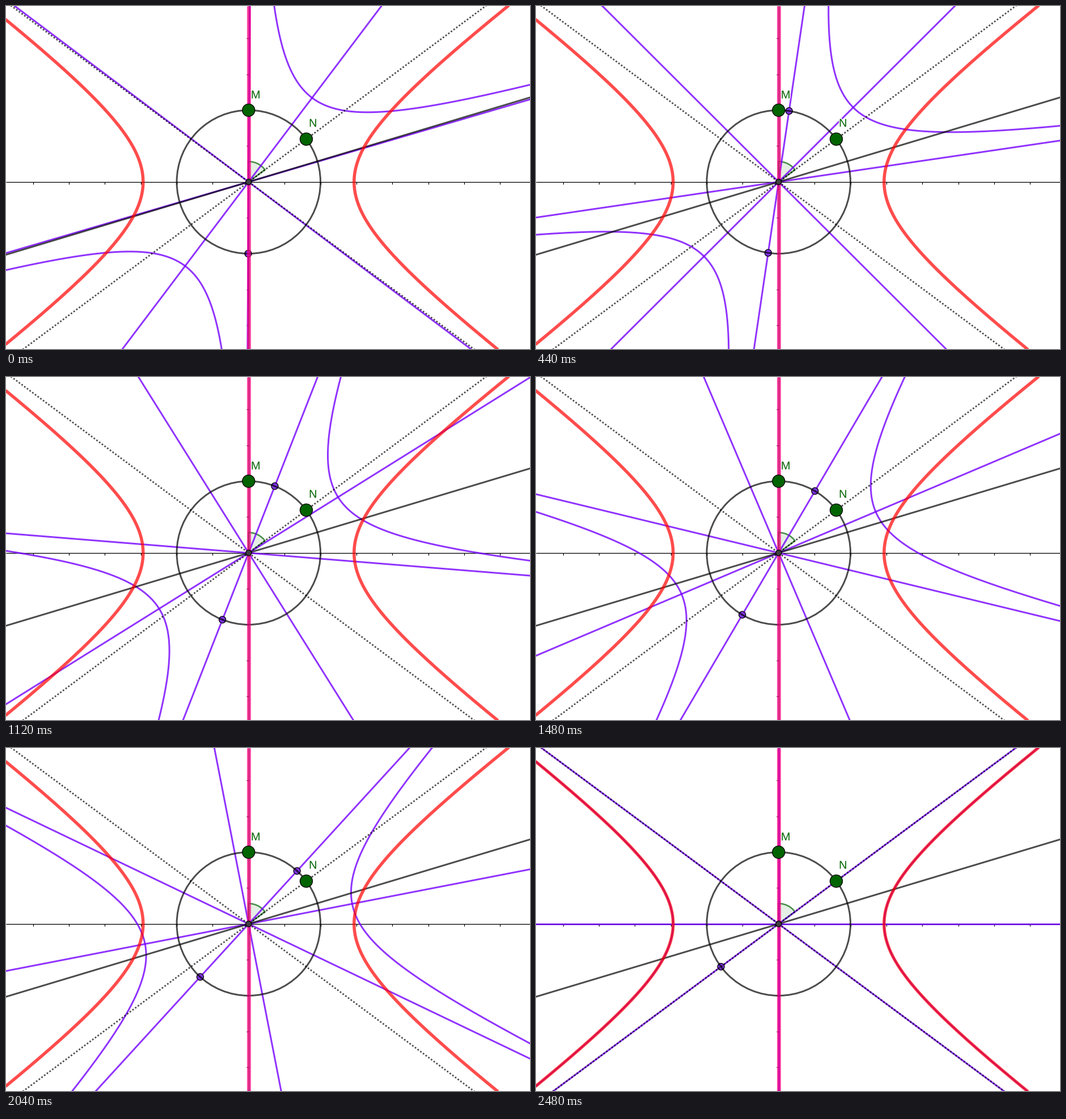
Recreate the animation shown at these times as a matplotlib script. Size 924 by 606 pixels, loop 2560 ms.

```python
import numpy as np
import matplotlib.pyplot as plt
from matplotlib.animation import FuncAnimation
from matplotlib.patches import Circle, Wedge
import matplotlib.patheffects as pe

W, H, DPI = 924, 606, 100
CX, CY = 427.8, 310.8
UNIT = 63.35            # pixels per axis unit
RADIUS = 2 * UNIT
VERTEX = 186            # semi-axis of the hyperbola
BETA = 36.63            # asymptote angle in degrees
FRAMES, STEP_MS = 64, 40

PURPLE = (0.46, 0, 1)
GREEN = "#006400"

fig = plt.figure(figsize=(W / DPI, H / DPI), dpi=DPI, facecolor="white")
ax = fig.add_axes([0, 0, 1, 1])
ax.set_xlim(0, W)
ax.set_ylim(H, 0)
ax.axis("off")


def px(width):
    """Convert pixels to points."""
    return width * 72 / DPI


def polar(angle, r):
    a = np.radians(angle)
    return CX + r * np.cos(a), CY - r * np.sin(a)


def stroke(x, y, color, width, z, alpha=0.7, **kw):
    return ax.plot(x, y, color=color, lw=px(width), alpha=alpha, zorder=z,
                   solid_capstyle="butt", dash_capstyle="butt", **kw)[0]


def ray(angle):
    """Both ends of a line through the centre."""
    return polar(angle, np.array([-800, 800]))


def hyperbola(angle):
    """Two branches, separated by a gap, with the main axis at an angle."""
    u = np.linspace(-2.6, 2.6, 240)
    x = VERTEX * np.cosh(u)
    y = VERTEX * np.tan(np.radians(BETA)) * np.sinh(u)
    x = np.concatenate([x, [np.nan], -x])
    y = np.concatenate([y, [np.nan], y])
    c, s = np.cos(np.radians(angle)), np.sin(np.radians(angle))
    return CX + x * c - y * s, CY - x * s - y * c


def dot(x, y, r, color, z, edge=1.3, alpha=1):
    ax_dot = Circle((x, y), r, facecolor=color, edgecolor="black",
                    lw=px(edge), alpha=alpha, zorder=z)
    return ax.add_patch(ax_dot)


# Coordinate axes with tick marks
stroke([0, W], [CY, CY], "black", 1.3, 1, alpha=1)
stroke([CX, CX], [0, H], "black", 1.3, 1, alpha=1)
for k in range(-6, 8):
    if k:
        x = CX + k * UNIT
        stroke([x, x], [CY, CY + 4], "black", 1.2, 1, alpha=1)
for k in range(-4, 5):
    if k:
        y = CY + k * UNIT
        stroke([CX - 4, CX], [y, y], "black", 1.2, 1, alpha=1)

# Angle between the two marked points
start, end = 360 - 90, 360 - BETA
ax.add_patch(Wedge((CX, CY), 36, start, end, facecolor=GREEN, alpha=0.1,
                   lw=0, zorder=2))
ax.add_patch(Wedge((CX, CY), 36, start, end, facecolor="none",
                   edgecolor=GREEN, alpha=0.7, lw=px(2.6), zorder=2))

# Turning curve, its axes and asymptotes
curve = stroke([], [], PURPLE, 3, 3, alpha=0.8)
offsets = (0, 90, BETA, -BETA)
lines = [stroke([], [], PURPLE, 3, 3, alpha=0.8) for _ in offsets]
poles = [dot(0, 0, 6, (0.5, 0.2, 0.9), 4) for _ in range(2)]

# Fixed figure
ax.add_patch(Circle((CX, CY), RADIUS, fill=False, edgecolor="black",
                    alpha=0.7, lw=px(3), zorder=5))
for angle in (BETA, -BETA):
    stroke(*ray(angle), "black", 2.8, 5, linestyle=(0, (1, 1.1)))
stroke(*ray(90 - 2 * BETA), "black", 3, 5)
stroke(*hyperbola(0), "red", 5.5, 6)
stroke([CX, CX], [0, H], (1, 0, 0.5), 7, 6)

dot(CX, CY, 5, "#404040", 8)
halo = [pe.withStroke(linewidth=px(3), foreground="white")]
for name, angle, tx, ty in (("M", 90, 440.3, 163.3), ("N", BETA, 541.3, 213.3)):
    dot(*polar(angle, RADIUS), 11, GREEN, 9)
    ax.text(tx, ty, name, color=GREEN, family="Liberation Sans",
            size=px(20), ha="center", va="baseline", zorder=10,
            path_effects=halo)


def turn(frame):
    """Whole degrees turned, held for two or three ticks at a time."""
    i = 26 if frame >= FRAMES - 2 else max(0, (3 * frame - 5) // 7)
    return np.round(np.interp(i, [0, 4, 8, 11, 15, 21, 26],
                              [0, 8, 16, 21, 30, 42, 53]))


def update(frame):
    tilt = 53 - turn(frame)
    curve.set_data(*hyperbola(tilt))
    for line, offset in zip(lines, offsets):
        line.set_data(*ray(tilt + offset))
    for pole, r in zip(poles, (RADIUS, -RADIUS)):
        pole.center = polar(tilt + BETA, r)
    return [curve, *lines, *poles]


anim = FuncAnimation(fig, update, frames=FRAMES, interval=STEP_MS,
                     init_func=lambda: update(0), repeat=True,
                     repeat_delay=0, blit=False)
plt.show()
```
